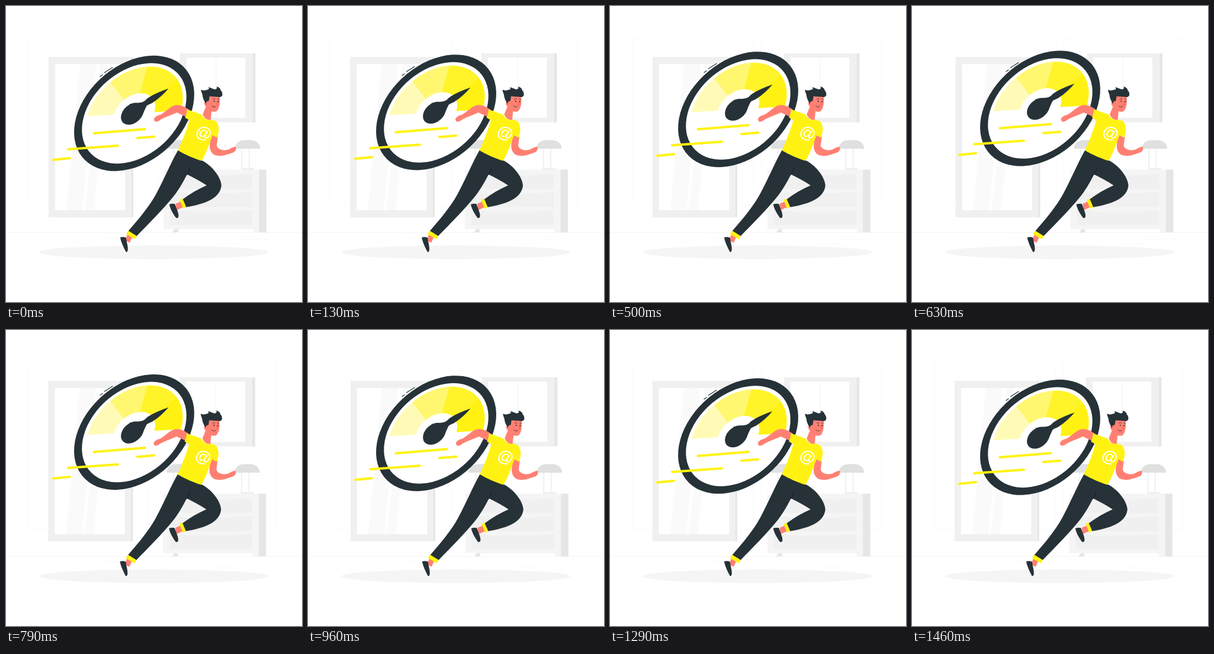
These frames come from a looping animation (500 by 500 pixels, 1500 ms). An HTML page:

```html
<!DOCTYPE html>
<html lang="en">
<head>
<meta charset="utf-8">
<title>Running at full speed</title>
<style>
  html, body { margin: 0; width: 100%; height: 100%; overflow: hidden; background: #fff; }
  svg { display: block; width: 100vw; height: 100vh; }
  .dark { fill: #263238; }
  .sun { fill: #fff212; }
  .skin { fill: #ff8073; }
  .white { fill: #fff; }
  .g1 { fill: #fafafa; }
  .g2 { fill: #f5f5f5; }
  .g3 { fill: #f0f0f0; }
  .g4 { fill: #e6e6e6; }
  .g5 { fill: #e0e0e0; }
  .ink { fill: none; stroke: #263238; stroke-linecap: round; stroke-linejoin: round; }
  text { font: 700 27px "Liberation Sans", Arial, sans-serif; fill: #fff; text-anchor: middle; }
</style>
</head>
<body>
<svg viewBox="0 0 500 500" xmlns="http://www.w3.org/2000/svg">
  <defs>
    <g id="lamp">
      <path d="M398.5 241V275M411 241V275" stroke="#f0f0f0" stroke-width="2"/>
      <path class="g3" d="M397 273.500h22v3.500h-22z"/>
      <path class="g5" d="M387 241C387 231 395 226.500 404 226.500H412C421 226.500 429 231 429.500 241Z"/>
    </g>
  </defs>

  <path d="M0 382.500H500" stroke="#f5f5f5"/>
  <path d="M53 399.500H86M166 391.500H190M110 399.500H128M390 393.500H447M353 401.500H390" stroke="#fafafa"/>

  <g id="room">
    <path d="M38.500 55.500H242.500V337.500H38.500ZM255.500 55.500H457.500V337.500H255.500Z" fill="none" stroke="#fafafa"/>

    <!-- mirror -->
    <path class="g4" d="M209 86H215V357H209Z"/>
    <path class="g3" d="M72 86H212V357H72Z"/>
    <path class="white" d="M83 98H201.500V345H83Z"/>
    <path class="g1" d="M125 98H153L129 345H102ZM160 98H172L149 345H133Z"/>

    <!-- window -->
    <path class="g4" d="M415 80H421.500V196.500H415Z"/>
    <path class="g3" d="M294 80H417V196.500H294Z"/>
    <path class="white" d="M305 87H404.500V189H305Z"/>
    <path d="M355 87V189" stroke="#f5f5f5" stroke-width="1.200"/>

    <!-- cabinet -->
    <path class="g4" d="M427 276.500H440V382.500H427ZM281 382.500L285 377H291V382.500Z"/>
    <path class="g2" d="M266 276.500H427.500V377H266ZM416 377H427.500V382.500H419Z"/>
    <g id="drawers" class="g3"></g>

    <use href="#lamp" x="-115"/>
    <use href="#lamp"/>
  </g>

  <ellipse class="g2" cx="249.500" cy="416" rx="193.500" ry="11.500"/>

  <g id="gauge">
    <!-- unit circles seen in perspective -->
    <g transform="matrix(97.8 -6.1 -27.1 97.3 216.5 181.6)">
      <circle class="dark" r="1"/>
      <circle class="white" r=".87"/>
      <g id="dial" class="sun"></g>
      <circle class="dark" cx="-.03" cy=".005" r=".19"/>
    </g>
    <path class="dark" d="M208 166L229 163C235 161.500 236 158 240 155.500C250 149 262 144 274.500 139.800C267 148.500 258 157 247 164C243 166.500 239 166.500 237 170C235 174 233 179 230 185Z"/>
    <path class="ink" stroke-width="1.200" d="M159 119.300L163 116.500M166.500 112.800L180 104.100"/>
    <path d="M148.500 215.200L234.500 208.200M222 223.300L250.500 221M105 242.200L189 236.200M79.800 260L108 257.300" fill="none" stroke="#fff212" stroke-width="4" stroke-linecap="round"/>
  </g>

  <g id="runner">
    <!-- feet -->
    <path class="skin" d="M206 384L214 389L209 400L201 396ZM287 334L296 330L299 340L288 345Z"/>
    <path class="dark" d="M193 391C196 389.800 200 390 203 391.500L204 398C205 402 206 406 206 411Q205.500 417 202.500 415C198.500 407 194.500 399 193 391Z"/>
    <path class="dark" d="M276 335C279 333.800 283 333.800 285.500 334.500L289 344C290.500 348 292 352 291.500 356Q290 359.500 287 357.500C282 350 277.500 343 276 335Z"/>

    <!-- legs -->
    <path class="dark" d="M291 243L330 260.500C345 267 363 287 364 303C362 326 334 335 303 340L298 327C311 317 325 309 339 303C329 296 317 290 306 284.500C299 298 291 312 282 323C264 345 242 367 220 389.500L206 381C225 359 242 339 254 317C267 293 279 264 291 243Z"/>
    <path class="ink" stroke-width=".8" style="stroke:#111a1f" d="M310.500 272C310 278 308 282 305.500 285.500"/>
    <path class="sun" d="M206.500 379.500L221 388.500L218 394L203 385.500ZM293.500 327.500L298.500 325.500L304.500 339.500L299.500 342.500Z"/>

    <!-- arms -->
    <path class="skin" d="M309 175C299 167.500 289 165 281 169.500C273 174 267 181 260 184C254 185 250 189 250 192L252 195.500C255 196 259 194 262 191.500C271 187 280 184 289 180L306 188Z"/>
    <path class="skin" d="M349 216C344 228 342 241 348 248C354 255.500 366 253.500 375 250.500L385 247C389 245 389.500 240 388 237.500C384 238 380 240 376 242.500C369 244.500 359 244 356 236L358 221Z"/>

    <!-- neck, shirt -->
    <path class="skin" d="M339 167L332.500 183C335 190 342 194 346 192L347.500 176Z"/>
    <path class="sun" d="M306 174.500L331 183.500C333 189 340 194 346.500 192L354 194C358 197 360 204 359.500 210C359 215 358 219 356.500 222.500L349 218.500C344 231 338 250 330.500 261.500C317 257.500 303 251 290.500 244C298 228 305 210 310 193L302.500 188.500C304.500 184 305.500 179 306 174.500Z"/>
    <text transform="translate(333.500 216) rotate(19)" y="7">@</text>

    <!-- head -->
    <path class="skin" d="M339 153C347 148 357 148 361 153C362 163 361 174 355.500 178C349 180.500 342 176 339 170C335 169 334 163 337 161Z"/>
    <path class="dark" d="M338 165.500C334.500 160 332 154 332 150C331 147 329.500 144 329.500 141.500C333 143 336 143 340 141.500C344 141 343 139 342 137C346 138 349 140 353 141C357 140 357 138 355.500 136C360 137 363 140 363 143C365 144 366 147 365.500 151C364 154 361 154.500 358 153.500C353 153 348 153 344 152.500C343 155 344 158 342 161C340 160 338 162 338 165.500Z"/>
    <g class="dark">
      <ellipse cx="352" cy="161" rx=".9" ry="1.300"/>
      <ellipse cx="358.500" cy="161.500" rx=".9" ry="1.300"/>
    </g>
    <path class="ink" stroke-width=".8" d="M349.500 157.500Q351 156 353.500 157M357.500 157Q359 156.500 360.500 158M348 169Q351 172 354.500 170"/>
    <path fill="none" stroke="#e85f55" stroke-width="1" d="M356 162L357.500 167L355.500 167.500"/>
  </g>
</svg>
<script>
  const LOOP = 1500, STEPS = 36, RISE = 10;
  const SHAKE = [0, -1, 2, -4, 4, -4, 4, -4, 2, -1, 0];
  const el = id => document.getElementById(id);
  const room = el('room'), runner = el('runner'), gauge = el('gauge');

  function addPath(parent, d, opacity = 1) {
    const p = document.createElementNS('http://www.w3.org/2000/svg', 'path');
    p.setAttribute('d', d);
    p.setAttribute('fill-opacity', opacity);
    parent.appendChild(p);
  }

  // a quarter of the half-ring, i = 0 at the left
  function sector(i, inner, outer) {
    const at = (r, k) => {
      const a = Math.PI * (1 + k / 4);
      return `${r * Math.cos(a)} ${r * Math.sin(a)}`;
    };
    return `M${at(outer, i)}A${outer} ${outer} 0 0 1 ${at(outer, i + 1)}` +
      `L${at(inner, i + 1)}A${inner} ${inner} 0 0 0 ${at(inner, i)}Z`;
  }

  [0.3, 0.6, 0.9, 1].forEach((o, i) => addPath(el('dial'), sector(i, 0.35, 0.81), o));
  [284, 315, 345].forEach(y =>
    addPath(el('drawers'), `M277 ${y}H302L306 ${y + 2}H388L392 ${y}H416V${y + 25}H277Z`));

  function sway(p) {
    const k = p * (SHAKE.length - 1), i = Math.floor(k);
    return SHAKE[i] + (SHAKE[i + 1] - SHAKE[i]) * (k - i);
  }

  function draw(ms) {
    // 24 poses a second, each taken mid-step
    const step = Math.floor(((ms + 5) % LOOP) / LOOP * STEPS);
    const p = (step + 0.5) / STEPS;
    const side = `translate(${sway(p)} 0)`;
    room.setAttribute('transform', side);
    runner.setAttribute('transform', side);
    gauge.setAttribute('transform', `translate(0 ${-RISE * (1 - Math.abs(1 - 2 * p))})`);
  }

  const start = performance.now();
  function tick() {
    draw(performance.now() - start);
    requestAnimationFrame(tick);
  }
  draw(0);
  requestAnimationFrame(tick);
</script>
</body>
</html>
```
